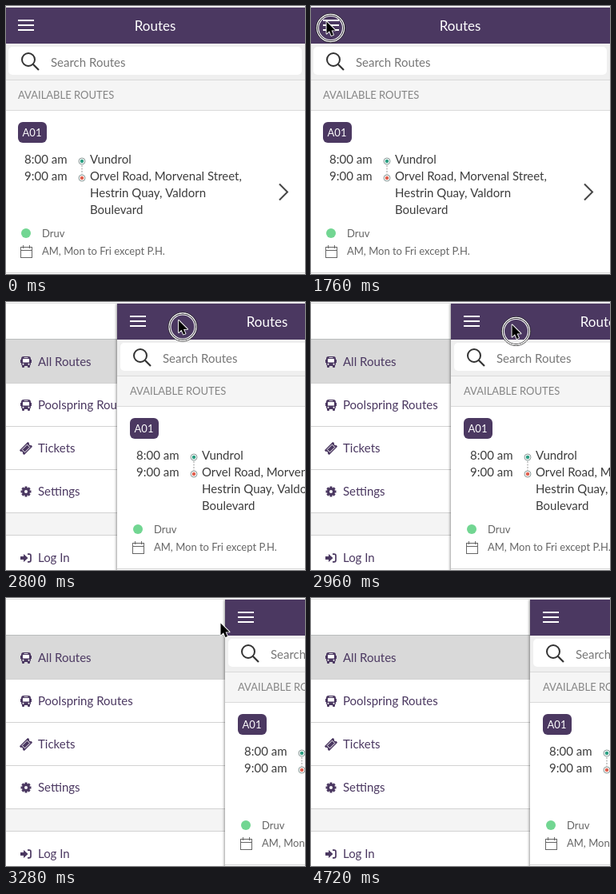
An HTML page with a canvas that plays this animation: 374 by 335 pixels, repeating every 5.04 s.

```html
<!DOCTYPE html>
<html lang="en">
<head>
<meta charset="utf-8">
<title>Routes menu</title>
<style>
html, body { margin: 0; width: 100%; height: 100%; overflow: hidden; background: #fff; }
canvas { display: block; width: 374px; height: 335px; }
</style>
</head>
<body>
<canvas id="stage"></canvas>
<script>
const W = 374, H = 335, LOOP = 5040, STEP = 80;
const PURPLE = '#4b3861', INK = '#3c3c3c', SOFT = '#666';
const canvas = document.getElementById('stage');
const ratio = window.devicePixelRatio || 1;
canvas.width = W * ratio;
canvas.height = H * ratio;
const c = canvas.getContext('2d');
c.scale(ratio, ratio);

// Key times followed by values; held poses repeat their key.
const POINTER = [
  [160, 221, 314], [240, 42, 90], [400, 42, 90], [560, 21, 20],
  [880, 21, 20], [1120, 19, 19], [2480, 19, 19], [2560, 75, 19],
  [2800, 215.5, 22.5], [2880, 238, 25], [2960, 251, 28], [3040, 260, 30],
  [3120, 268, 31], [3360, 268, 31], [3440, 257, 42], [3600, 210, 101],
  [3760, 179, 143], [3920, 175, 171], [4080, 175, 178], [4320, 175, 178],
  [4640, 190, 325]
];
const SETTLE = [[3040, 184.5], [3120, 205], [3200, 264], [3280, 275]];

function track(keys, t) {
  if (t <= keys[0][0]) return keys[0].slice(1);
  for (let i = 1; i < keys.length; i++) {
    const a = keys[i - 1], b = keys[i];
    if (t <= b[0]) {
      const u = (t - a[0]) / (b[0] - a[0]);
      return a.slice(1).map((v, k) => v + (b[k + 1] - v) * u);
    }
  }
  return keys[keys.length - 1].slice(1);
}

function rect(x, y, w, h, fill) {
  c.fillStyle = fill;
  c.fillRect(x, y, w, h);
}

function box(x, y, w, h, r, fill) {
  c.beginPath();
  c.roundRect(x, y, w, h, r);
  c.fillStyle = fill;
  c.fill();
}

function disc(x, y, r, fill) {
  c.beginPath();
  c.arc(x, y, r, 0, 7);
  c.fillStyle = fill;
  c.fill();
}

function ring(x, y, r, color, width) {
  c.beginPath();
  c.arc(x, y, r, 0, 7);
  c.strokeStyle = color;
  c.lineWidth = width;
  c.stroke();
}

function line(points, color, width) {
  c.beginPath();
  points.forEach(p => c.lineTo(p[0], p[1]));
  c.strokeStyle = color;
  c.lineWidth = width;
  c.stroke();
}

function text(s, x, y, size, color, align = 'left') {
  c.font = size + 'px Lato, sans-serif';
  c.textAlign = align;
  c.fillStyle = color;
  c.fillText(s, x, y);
}

function at(x, y, draw) {
  c.save();
  c.translate(x, y);
  draw();
  c.restore();
}

// Menu icons, each centred on its own origin.
function bus() {
  box(-6, -7, 12, 12, 3, PURPLE);
  rect(-7, -3, 14, 4, PURPLE);
  box(-5, 3, 3, 4, 1, PURPLE);
  box(2, 3, 3, 4, 1, PURPLE);
  rect(-4, -4, 8, 4.5, '#fff');
  rect(-2.5, -5.8, 5, 0.8, '#fff');
  disc(-3.5, 2.8, 1, '#fff');
  disc(3.5, 2.8, 1, '#fff');
}

function ticket() {
  c.rotate(-Math.PI / 4);
  box(-7.5, -4.2, 15, 8.4, 1, PURPLE);
  disc(-7.8, 0, 1.6, '#fff');
  disc(7.8, 0, 1.6, '#fff');
  c.strokeStyle = '#fff';
  c.lineWidth = 0.9;
  c.strokeRect(-4.4, -2.4, 8.8, 4.8);
}

function gear() {
  for (let i = 0; i < 4; i++) {
    rect(-1.5, -6.5, 3, 13, PURPLE);
    c.rotate(Math.PI / 4);
  }
  disc(0, 0, 4.9, PURPLE);
  disc(0, 0, 2, '#fff');
}

function signIn() {
  c.beginPath();
  [[-7, -2], [-3, -2], [-3, -5], [2.5, 0], [-3, 5], [-3, 2], [-7, 2]]
    .forEach(p => c.lineTo(p[0], p[1]));
  c.fillStyle = PURPLE;
  c.fill();
  c.beginPath();
  c.moveTo(2, -4.8);
  c.lineTo(4, -4.8);
  c.quadraticCurveTo(6, -4.8, 6, -2.8);
  c.lineTo(6, 2.8);
  c.quadraticCurveTo(6, 4.8, 4, 4.8);
  c.lineTo(2, 4.8);
  c.strokeStyle = PURPLE;
  c.lineWidth = 1.7;
  c.stroke();
}

function menu() {
  rect(0, 0, W, H, '#fff');
  rect(0, 47, W, 54, '#d9d9d9');
  rect(0, 264, W, 27, '#f4f4f4');
  rect(0, 46, W, 1, '#b9bdbd');
  [101, 155, 209, 263, 291].forEach(y => rect(0, y, W, 1, '#d2d2d2'));
  [
    ['All Routes', 75, bus], ['Poolspring Routes', 129, bus],
    ['Tickets', 183, ticket], ['Settings', 237, gear], ['Log In', 320, signIn]
  ].forEach(([label, y, icon]) => {
    at(25, y, icon);
    text(label, 40, y + 5, 15, PURPLE);
  });
}

function stop(y, color) {
  disc(95, y, 4.5, '#fff');
  ring(95, y, 4, '#8a9a98', 1);
  disc(95, y, 2.3, color);
}

function calendar() {
  c.strokeStyle = SOFT;
  c.lineWidth = 1;
  c.strokeRect(18.5, 301.5, 14, 13);
  line([[18, 305.5], [33, 305.5]], SOFT, 1);
  line([[21.5, 299], [21.5, 303]], SOFT, 1);
  line([[29.5, 299], [29.5, 303]], SOFT, 1);
}

function page() {
  c.save();
  c.shadowColor = 'rgba(0,0,0,.4)';
  c.shadowBlur = 3 * ratio;
  c.shadowOffsetX = -ratio;
  rect(-1, 2, W + 2, H, '#fff');
  c.restore();

  rect(-1, 2, W + 1, 45, PURPLE);
  [17, 23, 29].forEach(y => rect(15, y, 20, 2, '#fff'));
  text('Routes', 186.5, 31, 17, '#fff', 'center');

  rect(-1, 47, W + 1, 45, '#efefef');
  box(3, 51, 367, 35, 5, '#fff');
  ring(28, 67, 8, '#333', 2);
  line([[33.7, 72.7], [41, 80]], '#333', 2.2);
  text('Search Routes', 56, 76, 15, '#777');

  rect(-1, 92, W + 1, 39, '#f5f5f5');
  rect(-1, 92, W + 1, 1, '#dadada');
  rect(-1, 130, W + 1, 1, '#dadada');
  text('AVAILABLE ROUTES', 15, 116, 13, '#858585');

  box(15, 145, 36, 26, 6, PURPLE);
  text('A01', 32.5, 163, 13, '#fff', 'center');

  text('8:00 am', 76.5, 197, 15, INK, 'right');
  text('9:00 am', 76.5, 218, 15, INK, 'right');
  c.setLineDash([2, 1.5]);
  line([[95, 199], [95, 211]], '#999', 1);
  c.setLineDash([]);
  stop(194, '#2fa084');
  stop(215, '#e0604f');
  ['Vundrol', 'Orvel Road, Morvenal Street,', 'Hestrin Quay, Valdorn', 'Boulevard']
    .forEach((s, i) => text(s, 105, 197 + 21 * i, 15, INK));
  line([[342, 222.5], [352, 232.5], [342, 242.5]], '#444', 2);

  disc(25, 284, 6, '#72d692');
  text('Druv', 45, 289, 13, SOFT);
  calendar();
  text('AM, Mon to Fri except P.H.', 45, 311, 13, SOFT);
  rect(-1, 333, W + 1, 1, '#d6d6d6');
}

function arrow() {
  c.beginPath();
  [[0.5, 0.5], [0.5, 15.5], [4, 12.3], [6.4, 18], [9, 17], [6.6, 11.4], [11.5, 11.4]]
    .forEach(p => c.lineTo(p[0], p[1]));
  c.closePath();
  c.lineJoin = 'round';
  c.strokeStyle = '#fff';
  c.lineWidth = 1.8;
  c.stroke();
  c.fillStyle = '#000';
  c.fill();
  c.lineJoin = 'miter';
}

function pressMark() {
  ring(5.5, 8.5, 18, '#222', 1);
  ring(5.5, 8.5, 17, '#fff', 1.3);
  ring(5.5, 8.5, 16, '#222', 1);
  ring(5.5, 8.5, 15, '#fff', 1.1);
}

function render(t) {
  const [x, y] = track(POINTER, t);
  let slide = 0;
  if (t > 3040) slide = track(SETTLE, t)[0];
  else if (t > 2560) slide = x - 75.5;

  menu();
  at(Math.round(slide), 0, page);
  rect(0, 0, W, 1, '#fff');
  rect(0, 1, W, 1, '#dedede');

  if (t < 160 || t >= 4720) return;
  const pressed = (t >= 1760 && t < 2160) || (t >= 2320 && t < 3120);
  at(x, y, () => {
    if (pressed) pressMark();
    arrow();
  });
}

const start = performance.now();
function tick() {
  const t = (performance.now() - start) % LOOP;
  render(Math.floor(t / STEP) * STEP);
  requestAnimationFrame(tick);
}
tick();
</script>
</body>
</html>
```
